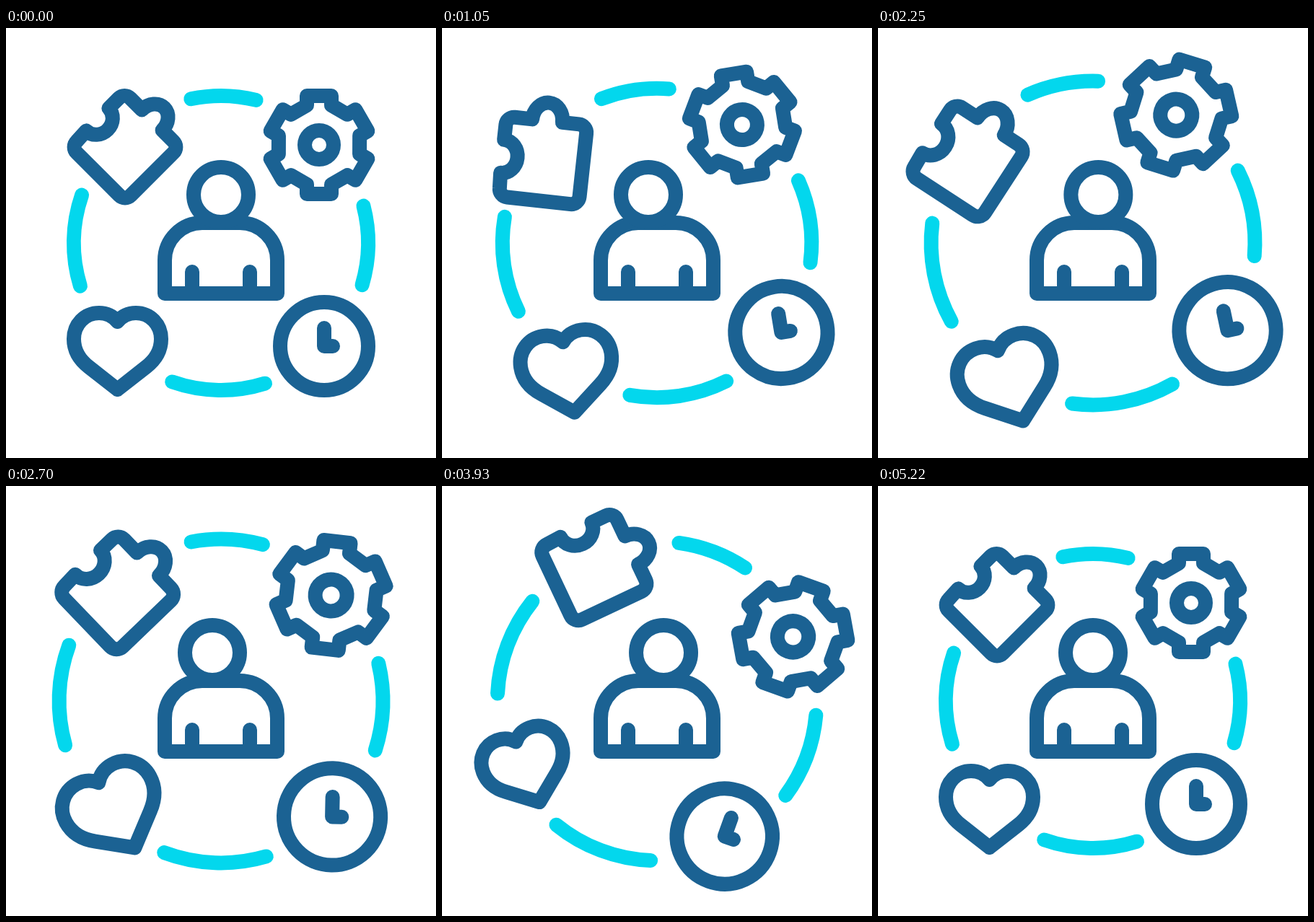
Write an HTML page with a canvas that moves like this. It is 596 px wide and 596 px high and loops after 5400 ms.

```html
<!DOCTYPE html>
<html>
<head>
<meta charset="utf-8">
<style>
  html, body { margin: 0; overflow: hidden; background: #fff; }
  canvas { display: block; }
</style>
</head>
<body>
<canvas id="stage" width="596" height="596"></canvas>
<script>
const ctx = document.getElementById('stage').getContext('2d');
const BLUE = '#1b6293', CYAN = '#03d7ed';
const LOOP = 5400, MID = 298, STROKE = 20, RAD = Math.PI / 180;

const clamp = p => Math.min(1, Math.max(0, p));
const ease = p => (1 - Math.cos(Math.PI * clamp(p))) / 2;
const mix = (p, softness) => clamp(p) + (ease(p) - clamp(p)) * softness;

// Rises from 0 to 1 after start and is back at 0 by end.
const hold = (t, start, end, ramp) => ease((t - start) / ramp) * ease((end - t) / ramp);

// The ring swings left, then right, then back to rest.
const swing = t =>
  -21.7 * mix((t - 460) / 1345, .35) +
  45.5 * mix((t - 1805) / 1785, .35) -
  23.8 * mix((t - 3590) / 1630, .35);

const grow = t => 1 + .1 * (mix((t - 330) / 1440, .5) - mix((t - 3590) / 1630, .5));

// The head looks left and right in turn.
const glance = t => [330, 1580, 2400, 3757, 5130].reduce((sum, start, i, times) =>
  i < 4 ? sum + (i % 2 ? 12 : -12) * hold(t, start, times[i + 1], 260) : sum, 0);

function circle(x, y, r) {
  const path = new Path2D();
  path.arc(x, y, r, 0, 2 * Math.PI);
  return path;
}

function gearPath(cx, cy) {
  const path = circle(cx, cy, 20);
  const tooth = new Path2D('M-17 -55V-68H17V-55L39 -42.2');
  for (let angle = 0; angle < 360; angle += 60)
    path.addPath(tooth, new DOMMatrix().translate(cx, cy).rotate(angle));
  return path;
}

function arcsPath() {
  const path = new Path2D();
  [15.6, 18.4, 18, 12.8].forEach((half, i) => {
    const arc = new Path2D();
    arc.arc(MID, MID, 204, (i * 90 + 1 - half) * RAD, (i * 90 + 1 + half) * RAD);
    path.addPath(arc);
  });
  return path;
}

function heartPath() {
  const half = new Path2D('M154.5 407C148 399 139 395 129 395C109 395 94 411 94 431' +
    'C94 448 102 460 115 470L154.5 501');
  const path = new Path2D(half);
  path.addPath(half, new DOMMatrix([-1, 0, 0, 1, 309, 0]));
  return path;
}

// A rounded square with a knob on top and a notch on the left, tilted by 45 degrees.
function puzzlePath() {
  const piece = new Path2D('M-54 -22V-42a11 11 0 0 1 11 -11H-20a20 24 0 0 1 40 0' +
    'H42a11 11 0 0 1 11 11V42a11 11 0 0 1 -11 11H-42a11 11 0 0 1 -11 -11' +
    'L-54 22a20 22 0 0 0 0 -44Z');
  const path = new Path2D();
  path.addPath(piece, new DOMMatrix().translate(165, 165).rotate(45));
  return path;
}

const arcs = arcsPath(), gear = gearPath(434, 162);
const heart = heartPath(), puzzle = puzzlePath();
const clock = circle(441, 441, 61);
clock.addPath(new Path2D('M441 416V441H453'));
const head = circle(298, 231, 38);
const body = new Path2D('M220 368V322a52 52 0 0 1 52 -52H324a52 52 0 0 1 52 52V368Z' +
  'M258 338V368M338 338V368');

function around(x, y, change, draw) {
  ctx.save();
  ctx.translate(x, y);
  change();
  ctx.translate(-x, -y);
  draw();
  ctx.restore();
}

function stroke(path, scale = 1, color = BLUE) {
  ctx.lineWidth = STROKE / scale;
  ctx.strokeStyle = color;
  ctx.stroke(path);
}

function spin(x, y, degrees, draw) {
  around(x, y, () => ctx.rotate(degrees * RAD), draw);
}

function orbit(t, scale, lift, draw) {
  around(MID, MID, () => {
    ctx.translate(0, lift);
    ctx.rotate(swing(t) * RAD);
    ctx.scale(scale, scale);
  }, draw);
}

function render(t) {
  const scale = grow(t);
  const beat = 1 - .12 * hold(t, 2600, 5200, 1300);
  ctx.fillStyle = '#fff';
  ctx.fillRect(0, 0, 596, 596);
  ctx.lineCap = ctx.lineJoin = 'round';

  orbit(t, scale, 0, () => {
    stroke(arcs, scale, CYAN);
    spin(169, 162, -29.5 * hold(t, 330, 1770, 720), () => stroke(puzzle, scale));
    spin(434, 162, 30 * hold(t, 1770, 2850, 540), () => stroke(gear, scale));
    spin(144.5, 421.5, -41 * hold(t, 1900, 5160, 1220), () =>
      around(154, 449, () => ctx.scale(beat, beat), () => stroke(heart, scale * beat)));
  });
  orbit(t, scale, -11 * hold(t, 3690, 4230, 270), () => stroke(clock, scale));

  stroke(body);
  around(0, 0, () => ctx.translate(glance(t), 0), () => stroke(head));
}

const start = performance.now();
function frame() {
  render((performance.now() - start) % LOOP);
  requestAnimationFrame(frame);
}
frame();
</script>
</body>
</html>
```
